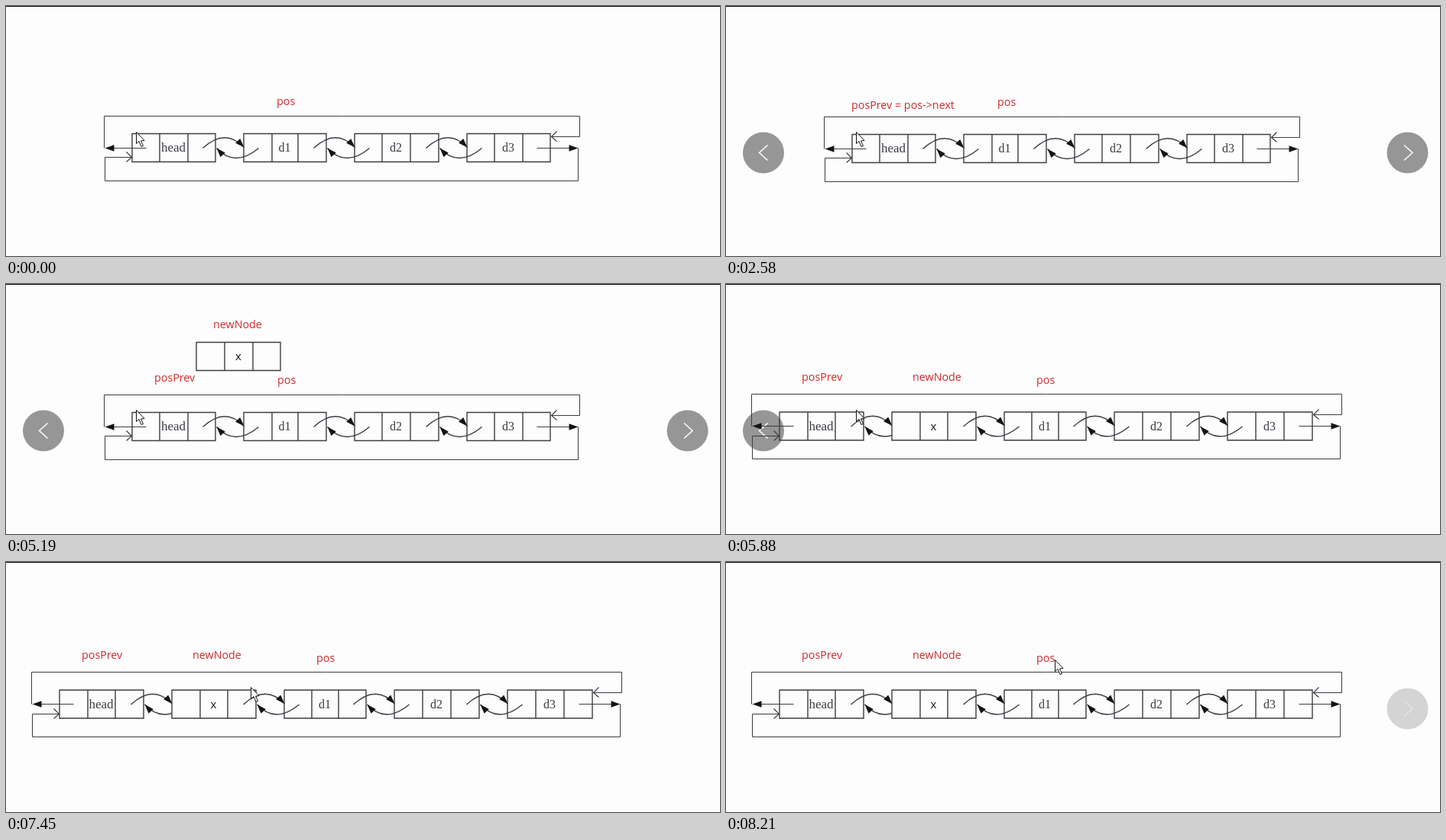
Animation of 934 by 328 pixels, one loop 8340 ms. Source, as an HTML page with a canvas:

```html
<!DOCTYPE html>
<html lang="en">
<head>
<meta charset="utf-8">
<title>Linked list insertion</title>
<style>
html, body { margin: 0; width: 100%; height: 100%; overflow: hidden; background: #fdfdfd; }
canvas { display: block; }
</style>
</head>
<body>
<canvas id="stage" width="934" height="328"></canvas>
<script>
const ctx = document.getElementById('stage').getContext('2d');
const LOOP = 8340, PAPER = '#fdfdfd', INK = '#3c3c44', DARK = '#141416', RED = '#d0282c';
const SANS = '"Open Sans", "Noto Sans", sans-serif';
const SERIF = '"Liberation Serif", "Noto Serif", serif';
const clamp = v => Math.max(0, Math.min(1, v));

// Node: left, first divider, second divider, right, label
const before = [
  [165, 201, 238, 274, 'head'], [311, 348, 382, 419, 'd1'],
  [456, 492, 529, 566, 'd2'], [603, 639, 676, 712, 'd3']
];
const after = [
  [70, 107, 143, 180, 'head'], [217, 254, 290, 327, 'x'], [364, 400, 435, 471, 'd1'],
  [508, 545, 582, 619, 'd2'], [656, 693, 730, 767, 'd3']
];

function line(points, width = 1, color = INK) {
  ctx.beginPath();
  points.forEach(([x, y]) => ctx.lineTo(x + .5, y + .5));
  ctx.lineWidth = width;
  ctx.strokeStyle = color;
  ctx.stroke();
}

function text(str, x, y, font, color, align = 'left') {
  ctx.font = font;
  ctx.fillStyle = color;
  ctx.textAlign = align;
  ctx.fillText(str, x, y);
}

const label = (str, x, y) => text(str, x, y, '14.3px ' + SANS, RED);

function arrowHead(x, y, angle) {
  ctx.save();
  ctx.translate(x + .5, y + .5);
  ctx.rotate(angle);
  ctx.beginPath();
  ctx.moveTo(0, 0);
  ctx.lineTo(-12, -4.2);
  ctx.lineTo(-12, 4.2);
  ctx.fillStyle = DARK;
  ctx.fill();
  ctx.restore();
}

function curve(x0, y0, cx, cy, x1, y1) {
  ctx.beginPath();
  ctx.moveTo(x0 + .5, y0 + .5);
  ctx.quadraticCurveTo(cx + .5, cy + .5, x1 + .5, y1 + .5);
  ctx.lineWidth = 1.4;
  ctx.strokeStyle = INK;
  ctx.stroke();
  arrowHead(x1, y1, Math.atan2(y1 - cy, x1 - cx));
}

function node([left, a, b, right, name], top) {
  const bottom = top + 37;
  ctx.save();
  ctx.translate(-.5, 0);
  line([[left, top], [right, top], [right, bottom], [left, bottom], [left, top - .5]], 1.4);
  for (const x of [a, b]) line([[x, top], [x, bottom]], 1.4);
  const font = name == 'x' ? '15px ' + SANS : (name == 'head' ? 17 : 16) + 'px ' + SERIF;
  text(name, (a + b) / 2, top + 24, font, name == 'x' ? DARK : INK, 'center');
  ctx.restore();
}

// Pair of curved arrows between a node ending at r and the next one
function link(r, y, clipped) {
  ctx.save();
  if (clipped) {
    ctx.beginPath();
    ctx.rect(0, 0, r + 37, 328);
    ctx.clip();
  }
  curve(r - 17, y, r + 12, y - 27, r + 37, y - 1);
  curve(r + 56, y, r + 25, y + 26, r + 1, y);
  ctx.restore();
}

function list(nodes, dy) {
  const left = nodes[0][0], right = nodes[nodes.length - 1][3];
  const y = 186 + dy, top = Math.floor(144 + dy), bottom = Math.floor(229 + dy);
  const row = Math.floor(y), inRow = Math.round(198 + dy), backRow = Math.floor(171 + dy);
  const l = left - 37, r = right + 36;

  line([[l, row], [l, top], [r + 2, top], [r + 2, backRow], [right + 1, backRow]]);
  line([[right + 8, backRow - 7], [right + 1, backRow], [right + 8, backRow + 6]], 1.2);
  line([[r, row], [r, bottom], [l + 1, bottom], [l + 1, inRow], [left - 1, inRow]]);
  line([[left - 8, inRow - 7], [left - 1, inRow], [left - 8, inRow + 6]], 1.2);
  line([[left + 18, row], [l + 2, row]], 1.2);
  arrowHead(l + 1, row, Math.PI);
  line([[right - 18, row], [r - 2, row]], 1.2);
  arrowHead(r, row, 0);

  nodes.forEach((n, i) => {
    node(n, 167 + dy);
    if (i < nodes.length - 1) link(n[3], y, nodes[i + 1][4] == 'x');
  });
}

function button(x, dir, alpha) {
  if (alpha <= 0) return;
  ctx.save();
  ctx.globalAlpha = alpha;
  ctx.beginPath();
  ctx.arc(x, 192.5, 27, 0, 7);
  ctx.fillStyle = '#969696';
  ctx.fill();
  line([[x - 5 * dir, 182], [x + 6 * dir, 192], [x - 5 * dir, 202]], 1.5, '#fff');
  ctx.restore();
}

function cursor(x, y) {
  const shape = [[0, 0], [0, 15], [3.5, 12], [6.5, 19], [9, 18], [6, 11.5], [10.5, 11]];
  ctx.beginPath();
  shape.forEach(([px, py]) => ctx.lineTo(x + px + .5, y + py + .5));
  ctx.closePath();
  ctx.fillStyle = '#fff';
  ctx.fill();
  ctx.lineWidth = 1;
  ctx.strokeStyle = '#111';
  ctx.stroke();
}

function cursorAt(t) {
  const step = Math.max(0, Math.min(21, Math.floor((t - 7370) / 40) + 1));
  if (step <= 3) return [170 + 50 * step, 165 - step / 3];
  const p = 1 - (1 - (step - 3) / 18) ** 2;
  return [Math.round(320 + 110 * p), Math.round(164 - 36 * p)];
}

function draw(t) {
  ctx.fillStyle = PAPER;
  ctx.fillRect(0, 0, 934, 328);
  ctx.fillStyle = '#000';
  ctx.fillRect(0, 0, 934, 1);

  const shown = t >= 1450;
  const fadeOut = clamp(1 - (Math.floor((t - 6770) / 40) + 1) / 3);
  const fadeIn = .4 * clamp((Math.floor((t - 8050) / 40) + 1) / 4);
  button(49, -1, shown ? fadeOut : 0);
  button(891.5, 1, shown && t < 5880 ? 1 : fadeIn);

  if (t < 5880) {
    list(before, shown ? 1 : 0);
    label('pos', shown ? 355 : 354, shown ? 131 : 130);
    if (t >= 3700) {
      label('newNode', 271, 58);
      label('posPrev', 194, 128);
      node([249, 286, 323, 359, 'x'], 76);
    } else if (shown) {
      label('posPrev = pos->next', 164, 135);
    }
  } else {
    list(after, .5);
    label('posPrev', 99, 127);
    label('newNode', 244, 127);
    label('pos', 406, 131);
  }
  cursor(...cursorAt(t));
}

const start = performance.now();
function tick() {
  draw((performance.now() - start) % LOOP);
  requestAnimationFrame(tick);
}
tick();
</script>
</body>
</html>
```
